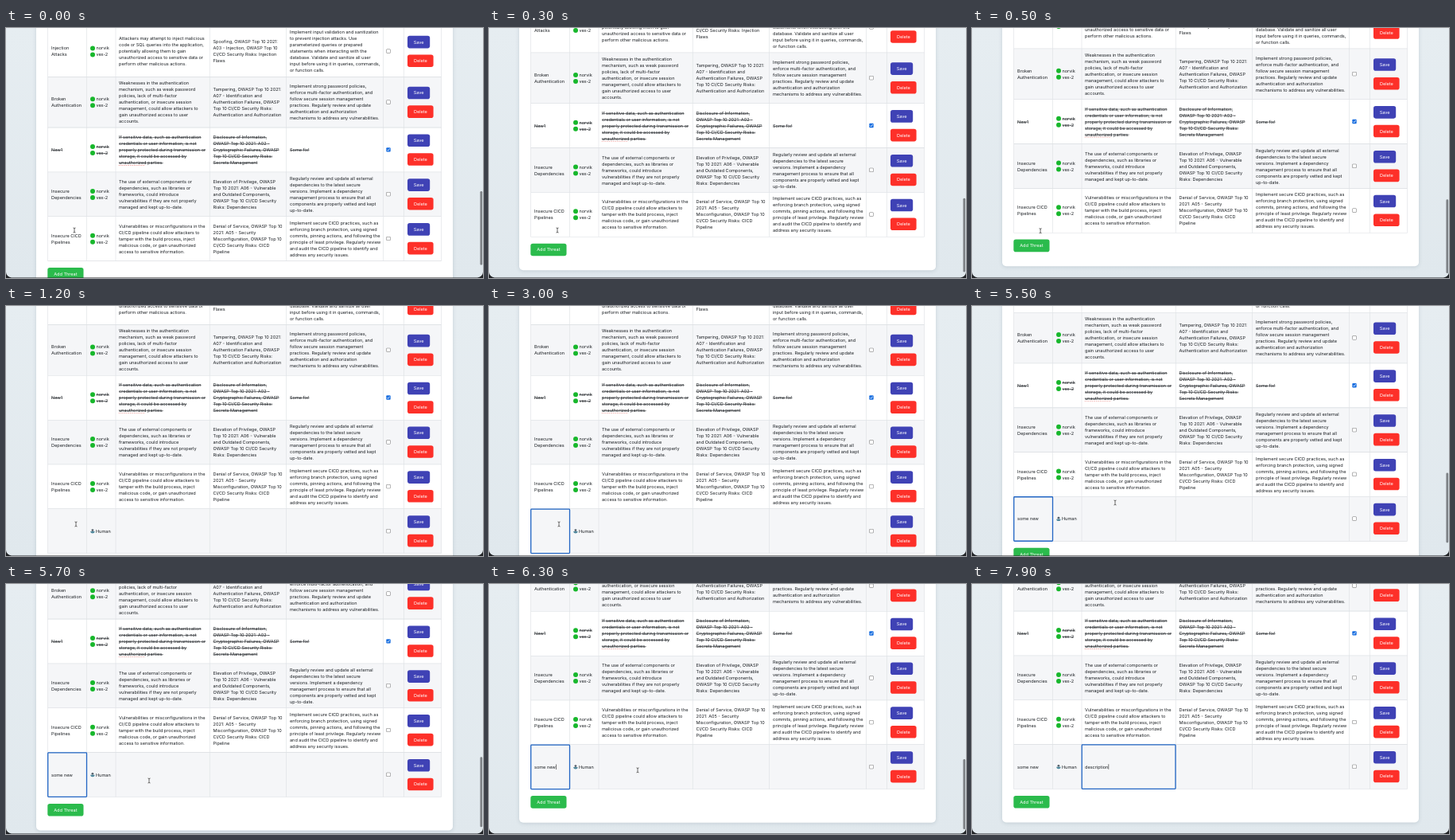
Write an HTML page with a canvas that moves like this. It is 600 by 314 pixels and loops after 8000 ms.

```html
<!DOCTYPE html>
<html lang="en">
<head>
<meta charset="utf-8">
<title>Threat table</title>
<style>
html, body { margin: 0; width: 100%; height: 100%; overflow: hidden; background: #e4ecf0; }
canvas { display: block; width: 600px; height: 314px; }
</style>
</head>
<body>
<canvas id="stage"></canvas>
<script>
const W = 600, H = 314, LOOP = 8000;
const canvas = document.getElementById('stage');
const ctx = canvas.getContext('2d');
const dpr = window.devicePixelRatio || 1;
canvas.width = W * dpr;
canvas.height = H * dpr;

const SIZE = 5.55, LINE = 8, BASE = 2.02;
const INK = '#1d2125', BORDER = '#dcdfe3';
const COLS = [52.5, 101.7, 138, 256.2, 352.6, 474.6, 500.6, 547.6];
const TEXT_X = [57, 142, 260.5, 357];
const MODELS = ['norvik', 'vex-2'];

const ROWS = [
  { top: -2.4, bottom: 61.6, cells: [
    'Injection|Attacks',
    'Attackers may attempt to inject malicious|code or SQL queries into the application,|potentially allowing them to gain|unauthorized access to sensitive data or|perform other malicious actions.',
    'Spoofing, OWASP Top 10 2021:|A03 - Injection, OWASP Top 10|CI/CD Security Risks: Injection|Flaws',
    'Implement input validation and sanitization|to prevent injection attacks. Use|parameterized queries or prepared|statements when interacting with the|database. Validate and sanitize all user|input before using it in queries, commands,|or function calls.'] },
  { top: 61.6, bottom: 125.3, cells: [
    'Broken|Authentication',
    'Weaknesses in the authentication|mechanism, such as weak password|policies, lack of multi-factor|authentication, or insecure session|management, could allow attackers to|gain unauthorized access to user|accounts.',
    'Tampering, OWASP Top 10 2021:|A07 - Identification and|Authentication Failures, OWASP|Top 10 CI/CD Security Risks:|Authentication and Authorization',
    'Implement strong password policies,|enforce multi-factor authentication, and|follow secure session management|practices. Regularly review and update|authentication and authorization|mechanisms to address any vulnerabilities.'] },
  { top: 125.3, bottom: 181.2, struck: true, cells: [
    'New1',
    'If sensitive data, such as authentication|credentials or user information, is not|properly protected during transmission or|storage, it could be accessed by|unauthorized parties.',
    'Disclosure of Information,|OWASP Top 10 2021: A02 -|Cryptographic Failures, OWASP|Top 10 CI/CD Security Risks:|Secrets Management',
    'Some fix!'] },
  { top: 181.2, bottom: 237, cells: [
    'Insecure|Dependencies',
    'The use of external components or|dependencies, such as libraries or|frameworks, could introduce|vulnerabilities if they are not properly|managed and kept up-to-date.',
    'Elevation of Privilege, OWASP|Top 10 2021: A06 - Vulnerable|and Outdated Components,|OWASP Top 10 CI/CD Security|Risks: Dependencies',
    'Regularly review and update all external|dependencies to the latest secure|versions. Implement a dependency|management process to ensure that all|components are properly vetted and kept|up-to-date.'] },
  { top: 237, bottom: 292.8, cells: [
    'Insecure CICD|Pipelines',
    'Vulnerabilities or misconfigurations in the|CI/CD pipeline could allow attackers to|tamper with the build process, inject|malicious code, or gain unauthorized|access to sensitive information.',
    'Denial of Service, OWASP Top 10|2021: A05 - Security|Misconfiguration, OWASP Top 10|CI/CD Security Risks: CICD|Pipeline',
    'Implement secure CICD practices, such as|enforcing branch protection, using signed|commits, pinning actions, and following the|principle of least privilege. Regularly review|and audit the CICD pipeline to identify and|address any security issues.'] }
];
const NEW_TOP = 292.8, NEW_BOTTOM = 348.7;

// Timeline, in ms
const ADD = 1020, FOCUS_NAME = 1500, FOCUS_DESC = 6500;
const nameKeys = [...'some new'].map((c, i) => 3150 + i * 107);
const descKeys = [...'description'].map((c, i) => i < 10 ? 6880 + i * 90 : 7880);

const clamp = v => Math.max(0, Math.min(1, v));
const ramp = (t, a, b) => clamp((t - a) / (b - a));
const ease = k => k * k * (3 - 2 * k);
const glide = (t, start, tau) => t < start ? 0 : 1 - Math.exp(-(t - start) / tau);
const mix = (a, b, k) => a + (b - a) * k;

function scrollAt(t) {
  return 38 * glide(Math.min(t, 950), 0, 188) / glide(950, 0, 188)
    + 53.2 * glide(t, 5450, 150);
}

function box(x, y, w, h, r, fill) {
  ctx.fillStyle = fill;
  ctx.beginPath();
  ctx.roundRect(x, y, w, h, r);
  ctx.fill();
}

function dot(x, y, r, fill) {
  ctx.fillStyle = fill;
  ctx.beginPath();
  ctx.arc(x, y, r, 0, 7);
  ctx.fill();
}

// Laid out at 14px and scaled down, so that advances stay fractional
function text(str, x, mid, color = INK, align = 'left') {
  const k = SIZE / 14;
  ctx.save();
  ctx.translate(x, mid + BASE);
  ctx.scale(k, k);
  ctx.font = '14px Inter, "Liberation Sans", sans-serif';
  ctx.textRendering = 'geometricPrecision';
  ctx.textAlign = align;
  ctx.fillStyle = color;
  ctx.fillText(str, 0, 0);
  const width = ctx.measureText(str).width * k;
  ctx.restore();
  return width;
}

function lines(list, x, mid, struck) {
  list.forEach((str, i) => {
    const y = mid + (i - (list.length - 1) / 2) * LINE;
    const width = text(str, x, y);
    if (struck) box(x, y + 0.2, width, 0.5, 0, INK);
  });
}

function misspelling(x, mid) {
  for (let i = 0; i < 33; i += 1.6) dot(x + i, mid + BASE + 1.4, 0.42, '#e0524a');
}

function button(label, x, w, mid, fill) {
  box(x, mid - 7.8, w, 15.6, 2.8, fill);
  text(label, x + w / 2, mid, '#fff', 'center');
}

function checkbox(mid, on) {
  if (on) {
    box(478.3, mid - 2.7, 5.4, 5.4, 1, '#1a6fe0');
    ctx.strokeStyle = '#fff';
    ctx.lineWidth = 0.8;
    ctx.beginPath();
    ctx.moveTo(479.5, mid + 0.1);
    ctx.lineTo(480.6, mid + 1.3);
    ctx.lineTo(482.6, mid - 1.4);
    ctx.stroke();
  } else {
    box(478.4, mid - 2.6, 5.2, 5.2, 1, '#777');
    box(478.9, mid - 2.1, 4.2, 4.2, 0.6, '#fff');
  }
}

function person(x, mid) {
  dot(x, mid - 1.2, 1.4, '#56606a');
  ctx.fillStyle = '#4e879b';
  ctx.beginPath();
  ctx.ellipse(x, mid + 0.3, 2.7, 2.4, 0, 0, Math.PI);
  ctx.fill();
}

function frameRow(top, bottom, shaded) {
  box(COLS[0], top, COLS[7] - COLS[0], bottom - top, 0, shaded ? '#f5f6f8' : '#fff');
  for (const x of COLS) box(x - 0.3, top, 0.6, bottom - top, 0, BORDER);
  for (const y of [top, bottom]) box(COLS[0], y - 0.3, COLS[7] - COLS[0], 0.6, 0, BORDER);
}

function controls(mid, on) {
  checkbox(mid - 0.2, on);
  button('Save', 505, 28.2, mid - 11.8, '#3f42b5');
  button('Delete', 505, 32.6, mid + 11.9, '#fd3029');
}

function threatRow(row, i) {
  const mid = (row.top + row.bottom) / 2;
  frameRow(row.top, row.bottom, i % 2);
  row.cells.forEach((cell, c) => lines(cell.split('|'), TEXT_X[c], mid, row.struck));
  MODELS.forEach((name, m) => dot(109, mid + (m - 0.5) * LINE, 3, '#18b72c'));
  lines(MODELS, 113.4, mid, row.struck);
  if (row.struck) misspelling(TEXT_X[1], mid + 2 * LINE);
  controls(mid, row.struck);
}

function typed(str, keys, x, mid, t, focus, blur) {
  const n = keys.filter(k => k <= t).length;
  const width = text(str.slice(0, n), x, mid);
  if (t < focus || t >= blur) return;
  const last = n ? keys[n - 1] : focus;
  if ((t - last) % 1000 < 500) box(x + width + 0.2, mid - 3.3, 0.55, 6.6, 0, '#111');
}

function newRow(t) {
  const mid = (NEW_TOP + NEW_BOTTOM) / 2;
  frameRow(NEW_TOP, NEW_BOTTOM, true);
  person(108.9, mid);
  text('Human', 113, mid);
  controls(mid, false);
  typed('some new', nameKeys, TEXT_X[0], mid, t, FOCUS_NAME, FOCUS_DESC);
  typed('description', descKeys, TEXT_X[1], mid, t, FOCUS_DESC, LOOP);
  if (t < FOCUS_NAME) return;
  const c = t < FOCUS_DESC ? 0 : 2;
  ctx.strokeStyle = '#2165c4';
  ctx.lineWidth = 1.3;
  ctx.beginPath();
  ctx.roundRect(COLS[c] + 0.2, NEW_TOP + 0.3, COLS[c + 1] - COLS[c] - 0.4, NEW_BOTTOM - NEW_TOP - 0.4, 0.8);
  ctx.stroke();
}

function card(bottom) {
  ctx.save();
  ctx.shadowColor = 'rgba(40, 60, 80, 0.16)';
  ctx.shadowBlur = 5 * dpr;
  ctx.shadowOffsetY = dpr;
  box(38, -60, 524, bottom + 60, 5, '#fff');
  ctx.restore();
}

function scrollbar(t, scroll) {
  const alpha = t < 3000 ? 1 - ramp(t, 950, 1150) : ramp(t, 5430, 5490) * (1 - ramp(t, 6350, 6700));
  if (!alpha) return;
  const k = 309 / (1046 + (t >= ADD ? 56 : 0));
  ctx.globalAlpha = alpha;
  box(596.4, (690 + scroll) * k + 1, 2.8, H * k, 1.4, '#7d8185');
  ctx.globalAlpha = 1;
}

function pointer(t) {
  if (t >= nameKeys[0] && t < 5000 || t >= descKeys[0]) return;
  let k = ease(ramp(t, 450, 900));
  let x = mix(86, 88, k), y = mix(254, 274, k);
  if (t >= 5000) {
    k = ease(ramp(t, 5000, 5400));
    const j = ease(ramp(t, 5950, 6400));
    x = mix(mix(88, 180, k), 188, j);
    y = mix(mix(274, 247, k), 232, j);
  }
  for (const [color, w] of [['#fff', 1.5], ['#222', 0.7]]) {
    ctx.strokeStyle = color;
    ctx.lineWidth = w;
    ctx.beginPath();
    ctx.moveTo(x - 1.5, y - 3);
    ctx.quadraticCurveTo(x, y - 3, x, y - 2);
    ctx.lineTo(x, y + 2);
    ctx.quadraticCurveTo(x, y + 3, x - 1.5, y + 3);
    ctx.moveTo(x + 1.5, y - 3);
    ctx.quadraticCurveTo(x, y - 3, x, y - 2);
    ctx.moveTo(x, y + 2);
    ctx.quadraticCurveTo(x, y + 3, x + 1.5, y + 3);
    ctx.stroke();
  }
}

function windowEdge() {
  ctx.fillStyle = '#222427';
  ctx.beginPath();
  ctx.rect(0, 0, W, H);
  ctx.roundRect(0, -20, W, H + 19.4, 7);
  ctx.fill('evenodd');
}

const backdrop = ctx.createLinearGradient(0, 0, 0, H);
backdrop.addColorStop(0, '#e6edf1');
backdrop.addColorStop(1, '#e0e8ed');

function draw(t) {
  const scroll = scrollAt(t), added = t >= ADD;
  const end = added ? NEW_BOTTOM : NEW_TOP;
  ctx.setTransform(dpr, 0, 0, dpr, 0, 0);
  ctx.fillStyle = backdrop;
  ctx.fillRect(0, 0, W, H);
  ctx.save();
  ctx.beginPath();
  ctx.rect(0, 0, W, H);
  ctx.clip();
  ctx.save();
  ctx.translate(0, -scroll);
  card(end + 42);
  ROWS.forEach(threatRow);
  if (added) newRow(t);
  button('Add Threat', 52.3, 45.2, end + 16.2, '#2bbb4c');
  ctx.restore();
  scrollbar(t, scroll);
  pointer(t);
  windowEdge();
  ctx.restore();
}

const start = performance.now();
function tick() {
  draw((performance.now() - start) % LOOP);
  requestAnimationFrame(tick);
}
tick();
</script>
</body>
</html>
```
